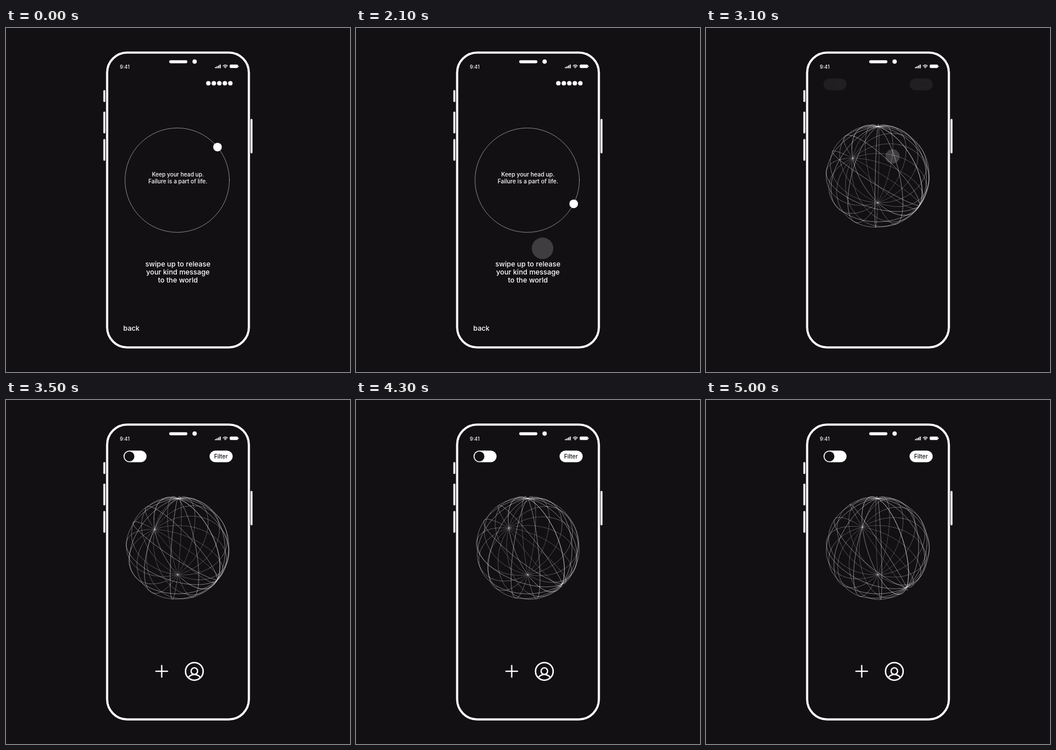
Animation, 600 px wide and 600 px high, one loop 5100 ms. Source, as an HTML page:

```html
<!DOCTYPE html>
<html lang="en">
<head>
<meta charset="utf-8">
<title>Kind message</title>
<style>
  html, body { margin: 0; width: 100%; height: 100%; overflow: hidden; background: #121013; }
  svg { display: block; width: 100vw; height: 100vh; }
  text { font-family: Inter, sans-serif; font-weight: 500; }
  .mid { text-anchor: middle; }
  .line { fill: none; stroke: #fff; stroke-linecap: round; }
</style>
</head>
<body>
<svg viewBox="0 0 600 600" xmlns="http://www.w3.org/2000/svg">
  <rect width="600" height="600" fill="#121013"/>

  <g id="phone" fill="#fff">
    <rect class="line" x="176.4" y="42.9" width="247.2" height="514.2" rx="35" stroke-width="3.8"/>
    <rect x="169.8" y="108.3" width="3.4" height="20.7" rx="1.5"/>
    <rect x="169.8" y="145.8" width="3.4" height="38" rx="1.5"/>
    <rect x="169.8" y="193.5" width="3.4" height="38" rx="1.5"/>
    <rect x="426.5" y="158.5" width="3.4" height="60" rx="1.5"/>
    <rect x="284.6" y="56.2" width="31.8" height="5.2" rx="2.3"/>
    <circle cx="329" cy="58.6" r="3.8"/>
    <text x="198.6" y="71.2" font-size="8.6">9:41</text>
    <rect x="364.6" y="68" width="1.8" height="2.2" rx=".5"/>
    <rect x="367.3" y="66.8" width="1.8" height="3.4" rx=".5"/>
    <rect x="370" y="65.3" width="1.8" height="4.9" rx=".5"/>
    <rect x="372.7" y="63.8" width="1.8" height="6.4" rx=".5"/>
    <path class="line" d="M378.8 66Q382.5 62.6 386.2 66M380.5 67.8Q382.5 66.1 384.5 67.8" stroke-width="1.2"/>
    <circle cx="382.5" cy="69.2" r=".9"/>
    <rect x="390.2" y="63.8" width="14.4" height="6" rx="1.7"/>
    <rect x="405" y="65.7" width="1" height="2.2" rx=".5"/>
  </g>

  <g id="compose" fill="#fff">
    <g id="dots"></g>
    <circle class="line" cx="298.6" cy="265.4" r="91" stroke-width=".8" stroke-opacity=".62"/>
    <circle id="bead" r="7.5"/>
    <g id="quote" class="mid" font-size="9.75">
      <text y="-2.9">Keep your head up.</text>
      <text y="8.7">Failure is a part of life.</text>
    </g>
    <g class="mid" font-size="12.25">
      <text x="299.8" y="416">swipe up to release</text>
      <text x="299.8" y="430.2">your kind message</text>
      <text x="299.8" y="444.4">to the world</text>
    </g>
    <text x="204.5" y="527.6" font-size="12.2">back</text>
  </g>

  <g id="globe"></g>

  <g id="top" fill="#fff">
    <rect x="205" y="88.2" width="40.2" height="20.4" rx="10.2"/>
    <circle cx="215.3" cy="98.4" r="8.6" fill="#121013"/>
    <rect x="355" y="88.2" width="40.4" height="20.4" rx="10.2"/>
    <text class="mid" x="374.8" y="101.9" font-size="9.9" fill="#121013">Filter</text>
  </g>

  <g id="nav" class="line" stroke-width="2.3">
    <path d="M261.5 473.2H281.7M271.6 463.1V483.3"/>
    <circle cx="328.5" cy="473.3" r="15.4" stroke-width="2.5"/>
    <circle cx="328.5" cy="472.9" r="5.7"/>
    <path d="M318.3 483.8C320.8 480.2 324.6 478.8 328.5 478.8S336.2 480.2 338.7 483.8"/>
  </g>

  <circle id="touch" fill="#fff" fill-opacity=".19"/>
</svg>

<script>
const LOOP = 5100, STEP = 100, RAD = Math.PI / 180;
const NS = 'http://www.w3.org/2000/svg';
const $ = id => document.getElementById(id);
const set = (el, attrs) => { for (const k in attrs) el.setAttribute(k, attrs[k]); };
const make = (parent, tag, attrs) => {
  const el = parent.appendChild(document.createElementNS(NS, tag));
  set(el, attrs);
  return el;
};

const ramp = (t, a, b) => Math.min(1, Math.max(0, (t - a) / (b - a)));
const inOut = (p, n) => p < .5 ? 2 ** (n - 1) * p ** n : 1 - (2 - 2 * p) ** n / 2;
const fade = (id, o, prop = 'opacity') => set($(id), { [prop]: o, display: o > 0 ? 'inline' : 'none' });

for (let i = 0; i < 5; i++) make($('dots'), 'circle', { cx: 352.9 + 9.6 * i, cy: 96.3, r: 3.9 });

// Globe: two perpendicular bundles of great circles seen in perspective.
const CX = 299.5, CY = 258, DIST = 2.2;
const FOCAL = 90 * Math.sqrt(DIST * DIST - 1);
const TILT = 41 * RAD, CIRCLES = 8, PARTS = 96, BANDS = 6;
const bands = Array.from({ length: BANDS }, (_, i) => {
  const k = i / (BANDS - 1);
  return make($('globe'), 'path', {
    class: 'line', 'stroke-width': .55 + .12 * k, 'stroke-opacity': .42 + .24 * k, 'stroke-linecap': 'butt'
  });
});

const mix = (u, a, v, b) => u.map((x, i) => x * a + v[i] * b);
const project = ([x, y, z]) => {
  const s = FOCAL / (DIST - z);
  return (CX + x * s).toFixed(2) + ' ' + (CY + y * s).toFixed(2);
};

function drawGlobe(t) {
  const az = (42.8 - .009 * (t - 3100)) * RAD;
  const s = Math.sin(TILT), c = Math.cos(TILT);
  const around = a => [Math.sin(a), s * Math.cos(a), c * Math.cos(a)];
  const A = [0, -c, s], B = around(az), C = around(az - Math.PI / 2);
  const d = Array(BANDS).fill('');

  const ring = (pole, side) => {
    let last = -1;
    const at = i => {
      const a = i / PARTS * 2 * Math.PI;
      return mix(pole, Math.cos(a), side, Math.sin(a));
    };
    for (let i = 0; i < PARTS; i++) {
      const p = at(i), q = at(i + 1);
      const band = Math.min(BANDS - 1, Math.floor(((p[2] + q[2]) / 4 + .5) * BANDS));
      if (band !== last) d[band] += 'M' + project(p);
      d[band] += 'L' + project(q);
      last = band;
    }
  };

  for (let i = 0; i < CIRCLES; i++) {
    const a = i * Math.PI / CIRCLES;
    ring(A, mix(B, Math.cos(a), C, Math.sin(a)));
    ring(B, mix(A, Math.cos(a), C, Math.sin(a)));
  }
  bands.forEach((path, i) => set(path, { d: d[i] }));
}

function render(t) {
  const turn = (-39.4 + .0316 * t) * RAD;
  set($('bead'), { cx: 298.6 + 91 * Math.cos(turn), cy: 265.4 + 91 * Math.sin(turn) });

  const breath = 1.024 - .024 * Math.cos(2 * Math.PI * t / 2900);
  set($('quote'), { transform: `translate(299.8 262.1) scale(${breath})` });

  const drag = inOut(ramp(t, 1800, 2600), 2);
  const size = ramp(t, 1500, 1800) * (1 - ramp(t, 3000, 3300));
  set($('touch'), { cx: 325.4, cy: 447 - 223 * drag, r: 18.8 * size });

  fade('compose', 1 - inOut(ramp(t, 2200, 2700), 2));
  const globe = inOut(ramp(t, 2350, 2950), 2);
  fade('globe', globe);
  if (globe) drawGlobe(t);
  fade('top', inOut(ramp(t, 3000, 3400), 3), 'fill-opacity');
  fade('nav', inOut(ramp(t, 3100, 3450), 3));
}

const start = performance.now();
function tick() {
  const t = (performance.now() - start) % LOOP;
  render(Math.floor(t / STEP) * STEP);
  requestAnimationFrame(tick);
}
tick();
</script>
</body>
</html>
```
